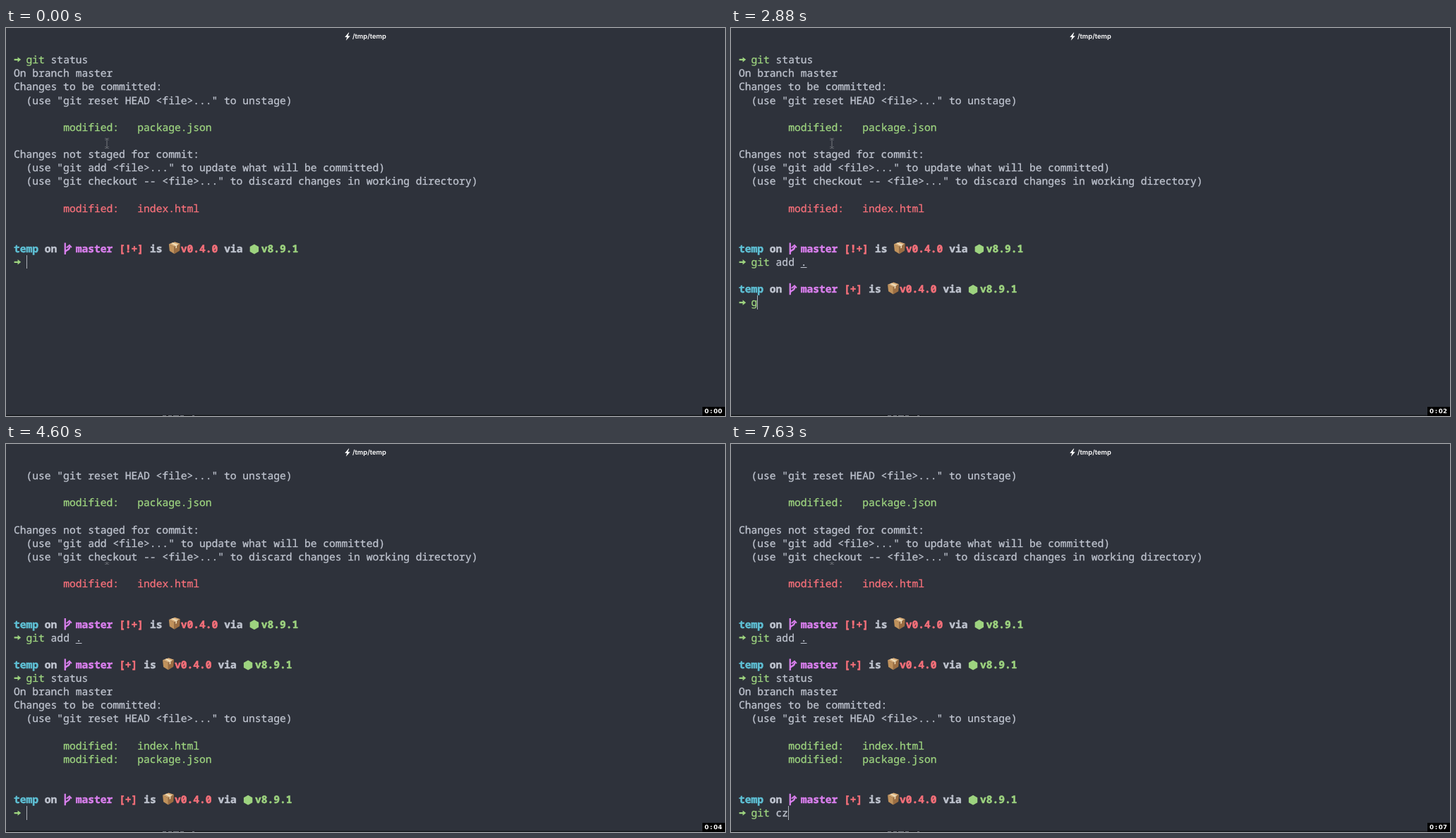
Write an HTML page that moves like this. It is 1019 px wide and 550 px high and loops after 8 s.

```html
<!DOCTYPE html>
<html lang="en">
<head>
<meta charset="utf-8">
<title>Terminal</title>
<style>
  html, body { margin: 0; width: 100%; height: 100%; overflow: hidden; background: #2e323b; }
  svg { display: block; width: 1019px; height: 550px; }
  text { white-space: pre; text-rendering: geometricPrecision; }
  #screen text {
    font: 500 14.62px "Noto Sans Mono", "DejaVu Sans Mono", monospace;
    stroke: var(--ink); stroke-width: .3px;
  }
  #screen .bold { font-weight: 800; stroke-width: .5px; }
  .fg { --ink: #bfc4cf; }
  .green { --ink: #9dd37f; }
  .red { --ink: #f6707a; }
  .cyan { --ink: #5fc1d6; }
  .purple { --ink: #d97fed; }
  .fg, .green, .red, .cyan, .purple { fill: var(--ink); }
  .title { font: 600 9.4px Inter, "Liberation Sans", sans-serif; fill: #fff; }
  #clock { font: 700 8.6px "DejaVu Sans", sans-serif; fill: #fff; text-anchor: middle; }
</style>
</head>
<body>
<svg viewBox="0 0 1019 550">
  <defs>
    <clipPath id="tail"><rect x="136" y="167" width="14" height="5"/></clipPath>
    <path id="arrow" d="M.6 8.6h5V6l4.6 3.7-4.6 3.7v-2.6h-5z" class="green"/>
    <g id="branch" fill="none" stroke="#d97fed" stroke-width="2.3">
      <path d="M2.6 1.5v16.5M2.6 15.5C3 10.5 9 13.5 9 7"/>
      <path d="M4.6 8.6 8.8 5l3 3.2" stroke-width="2"/>
    </g>
    <g id="box" transform="translate(0 -1)">
      <path d="M.6 4.4 9 1.2l7.6 2.6L8.4 8z" fill="#d9ad78"/>
      <path d="M.6 4.4 8.4 8v10.2L1.6 14z" fill="#c0925c"/>
      <path d="M8.4 8l8.2-4.2-.8 10-7.4 4.4z" fill="#9a6d42"/>
      <path d="M4 3.1 6 2.4l8 2.8-2.2 1.1v3.4l-1.6.8V7z" fill="#eedcb8"/>
    </g>
    <path id="hex" d="M7.6 3.6 13.8 7.1v7l-6.2 3.5-6.2-3.5v-7z" class="green"/>
  </defs>
  <rect width="1019" height="550" fill="#2e323b"/>
  <path d="M485.6 6.6 480.2 13h3.1l-1.5 4.8 5.9-6.6h-3.3l1.9-4.6z" fill="#fff"/>
  <text class="title" x="491" y="15.4">/tmp/temp</text>
  <g id="screen"></g>
  <rect id="caret" width="1" fill="#aeb2ba"/>
  <g id="pointer" fill="none">
    <path d="M140 157.5h2l1 1 1-1h2M143 158.5v10M140 169.5h2l1-1 1 1h2" stroke="#8a8e96" stroke-width="1.8"/>
    <path d="M140 157.5h2l1 1 1-1h2M143 158.5v10M140 169.5h2l1-1 1 1h2" stroke="#23262c"/>
  </g>
  <rect y="548.6" width="1019" height="1.4" fill="#15171b"/>
  <path d="M222 549.5h5m3 0h5m2 0h8m2 0h5m12 0h3" stroke="#6d7179"/>
  <rect x="987" y="537" width="32" height="13" fill="#000"/>
  <text id="clock" x="993 999.4 1005.7 1012.1" y="546.2"></text>
</svg>
<script>
const LOOP = 8000, LEFT = 11, TOP = 35.14, CELL = 8.77, LINE = 19.13;
const $ = id => document.getElementById(id);
const screen = $('screen'), caret = $('caret'), clock = $('clock'), pointer = $('pointer');

const run = (col, text, cls = 'fg') => ({ col, text, cls });
const icon = (col, id) => ({ col, id });
const line = text => [run(text.search(/\S/), text.trim())];
const modified = (file, cls) => [run(8, 'modified:   ' + file, cls)];

function prompt(flags) {
  const at = 18 + flags.length;
  return [
    run(0, 'temp', 'cyan bold'), run(5, 'on', 'fg bold'),
    icon(8, 'branch'), run(10, 'master', 'purple bold'),
    run(17, flags, 'red bold'), run(at, 'is', 'fg bold'),
    icon(at + 3, 'box'), run(at + 5, 'v0.4.0', 'red bold'), run(at + 12, 'via', 'fg bold'),
    icon(at + 16, 'hex'), run(at + 18, 'v8.9.1', 'green bold')
  ];
}

function command(text) {
  const runs = [icon(0, 'arrow')];
  if (text) runs.push(run(2, text.slice(0, 3), 'green'));
  const args = text.slice(4);
  if (args) runs.push(run(6, args));
  if (args.endsWith('.')) runs.push({ col: 10, underline: true });
  return runs;
}

const commands = ['git add .', 'git status', 'git cz'];
const staged = [
  line('On branch master'),
  line('Changes to be committed:'),
  line('  (use "git reset HEAD <file>..." to unstage)'),
  []
];

// All terminal lines, with the three typed commands cut to the given lengths.
const buffer = typed => [
  command('git status'), ...staged,
  modified('package.json', 'green'), [],
  line('Changes not staged for commit:'),
  line('  (use "git add <file>..." to update what will be committed)'),
  line('  (use "git checkout -- <file>..." to discard changes in working directory)'), [],
  modified('index.html', 'red'), [], [],
  prompt('[!+]'), command(commands[0].slice(0, typed[0])), [],
  prompt('[+]'), command(commands[1].slice(0, typed[1])), ...staged,
  modified('index.html', 'green'), modified('package.json', 'green'), [], [],
  prompt('[+]'), command(commands[2].slice(0, typed[2]))
];

// last: last visible line, input: index of the command being typed
const scenes = [
  { last: 15, scroll: 0, input: 0 },
  { last: 16, scroll: 0 },
  { last: 18, scroll: 0, input: 1 },
  { last: 26, scroll: 1 },
  { last: 28, scroll: 3, input: 2 }
];

const step = (time, scene, chars = 0, lit = true) => ({ time, scene, chars, lit });
const typing = (scene, chars, start, gap, count) =>
  Array.from({ length: count }, (_, i) => step(start + i * gap, scene, chars + i));

const steps = [
  step(0, 0), step(300, 0, 1), step(890, 0, 1, false), step(1140, 0, 3),
  ...typing(0, 4, 1440, 118, 6),
  step(2430, 1), step(2580, 2), step(2880, 2, 1), step(3030, 2, 3),
  ...typing(2, 4, 3320, 140, 7),
  step(4460, 3), step(4600, 4), step(5200, 4, 0, false), step(5440, 4, 1),
  step(5740, 4, 3), step(5890, 4, 4), step(6490, 4, 4, false), step(7090, 4, 4),
  step(7330, 4, 5), step(7630, 4, 6)
];
const seconds = [1040, 2130, 3030, 4160, 5300, 6190, 7190];

function add(tag, attrs, text = '') {
  const el = document.createElementNS('http://www.w3.org/2000/svg', tag);
  for (const key in attrs) el.setAttribute(key, attrs[key]);
  el.textContent = text;
  screen.append(el);
}

function drawItem(item, top) {
  const x = LEFT + item.col * CELL;
  if (item.id) add('use', { href: '#' + item.id, x, y: top });
  else if (item.underline) add('rect', { x, y: Math.round(top + 17.4), width: CELL, height: 1, class: 'fg' });
  else add('text', { x, y: top + 15, class: item.cls }, item.text);
}

function draw({ scene, chars, lit }) {
  const { last, scroll, input } = scenes[scene];
  const typed = commands.map((c, i) => i === input ? chars : c.length);
  const rowTop = row => TOP + (row - scroll) * LINE;
  screen.replaceChildren();
  buffer(typed).forEach((items, row) => {
    if (row >= scroll && row <= last) items.forEach(item => drawItem(item, rowTop(row)));
  });
  const col = input === undefined ? 0 : 2 + chars;
  const y = Math.round(rowTop(last));
  caret.setAttribute('x', Math.round(LEFT + col * CELL));
  caret.setAttribute('y', y);
  caret.setAttribute('height', Math.round(rowTop(last + 1)) - y);
  caret.style.display = lit ? '' : 'none';
  if (scroll) pointer.setAttribute('clip-path', 'url(#tail)');
  else pointer.removeAttribute('clip-path');
}

let shown;
function frame() {
  const t = performance.now() % LOOP;
  const current = steps.findLast(s => s.time <= t);
  if (current !== shown) draw(shown = current);
  const label = '0:0' + seconds.filter(s => s <= t).length;
  if (clock.textContent !== label) clock.textContent = label;
  requestAnimationFrame(frame);
}
frame();
</script>
</body>
</html>
```
